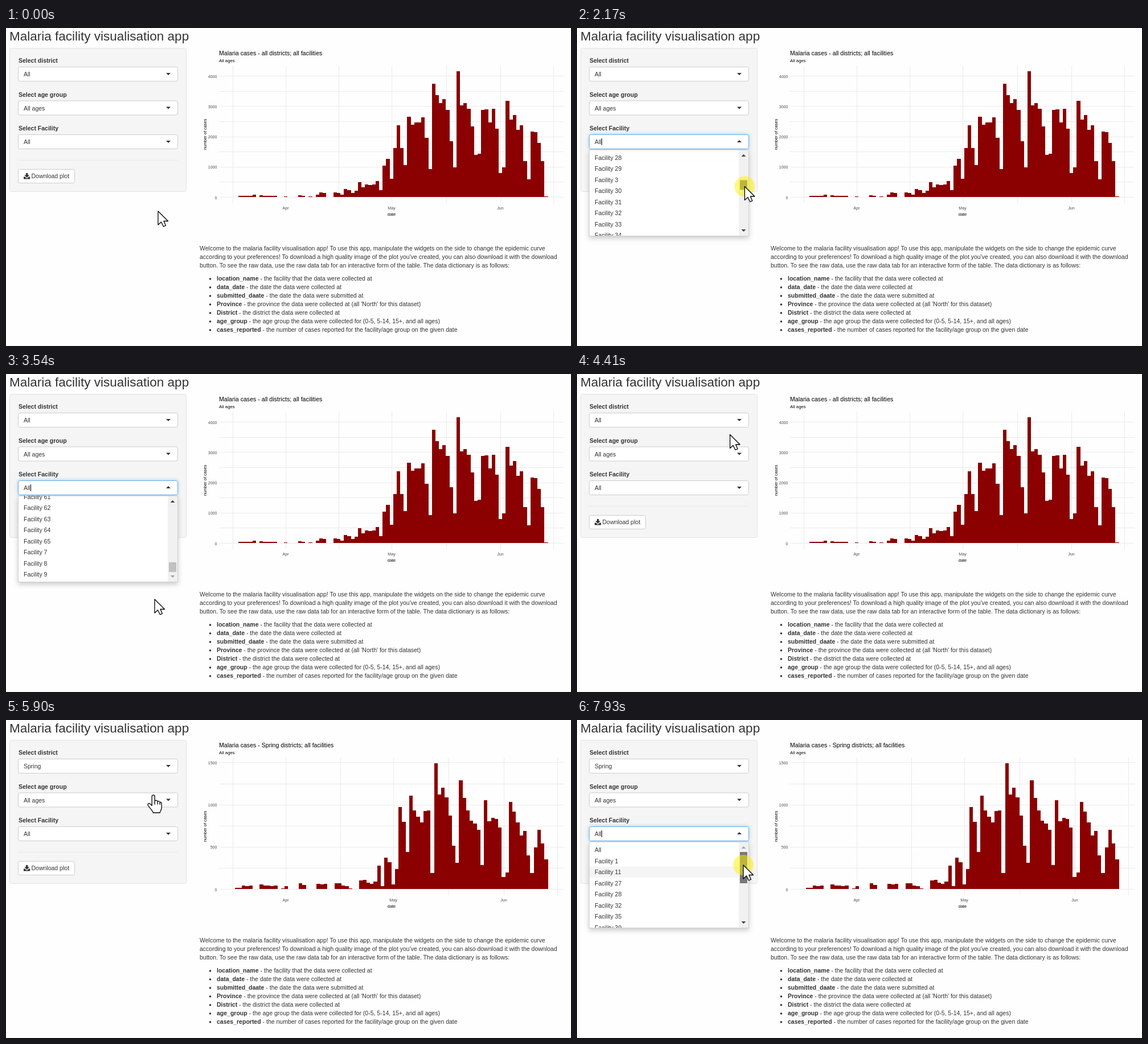
Write an HTML page that moves like this. It is 992 px wide and 559 px high and loops after 7.99 s.

```html
<!DOCTYPE html>
<html lang="en">
<head>
<meta charset="utf-8">
<title>Malaria facility visualisation app</title>
<style>
  html, body { margin: 0; width: 100%; height: 100%; overflow: hidden; background: #fefefe; }
  svg { display: block; width: 992px; height: 559px; }
  text { font: 10.5px "Liberation Sans", Arial, sans-serif; fill: #333; white-space: pre; }
  .b { font-weight: bold; }
  .h { font-size: 22.5px; }
  .ct { font-size: 10.6px; fill: #000; }
  .cs { font-size: 7.8px; fill: #000; }
  .ca { font-size: 7.4px; fill: #000; }
  .cl { font-size: 7.1px; fill: #4d4d4d; }
  .mid { text-anchor: middle; }
  .end { text-anchor: end; }
  .field { fill: #fff; stroke: #ccc; }
  .on .field { stroke: #66afe9; filter: drop-shadow(0 0 3px rgba(102,175,233,.6)); }
  .menu { fill: #fff; stroke: #d2d2d2; filter: drop-shadow(0 4px 4px rgba(0,0,0,.2)); }
  .hi { fill: #f5f5f5; }
  .cur { fill: #fff; stroke: #000; stroke-width: 1.3; stroke-linejoin: round; }
</style>
</head>
<body>
<svg id="stage" viewBox="0 0 992 559" xmlns="http://www.w3.org/2000/svg"></svg>
<script>
const LOOP = 7990, ROW = 19.5;

// bar heights in pixels, one per day
const allBars = [
  0, 2, 2, 2, 2, 4, 0, 3, 2, 2, 2, 2, 0, 0, 1, 0, 0, 0, 3, 2, 0, 1, 0, 4, 8, 7, 0, 0, 8, 7,
  4, 14, 12, 7, 11, 26, 17, 22, 21, 22, 28, 12, 55, 67, 32, 86, 126, 86, 56, 141, 127, 131,
  131, 140, 104, 49, 199, 179, 165, 172, 153, 98, 52, 221, 161, 165, 155, 124, 74, 76, 153,
  154, 131, 155, 120, 42, 52, 169, 136, 144, 118, 126, 63, 31, 115, 114, 95, 63, 1];
const springBars = [
  2, 2, 6, 5, 6, 0, 0, 8, 6, 6, 5, 6, 0, 1, 5, 0, 0, 0, 10, 7, 0, 0, 0, 9, 8, 9, 0, 0, 10, 10,
  6, 5, 1, 0, 0, 15, 16, 11, 9, 13, 41, 5, 55, 47, 8, 35, 144, 118, 65, 164, 138, 127, 117,
  137, 138, 28, 221, 166, 178, 161, 129, 76, 46, 191, 160, 138, 120, 115, 104, 42, 156, 119,
  125, 123, 108, 21, 29, 153, 136, 117, 94, 102, 59, 28, 73, 104, 80, 52];

// pointer path: time, x, y
const path = [
  [40, 267, 322], [400, 290, 180], [590, 288, 207], [790, 288, 207], [820, 288, 194],
  [1300, 288, 194], [1440, 288, 228], [1520, 288, 228], [1700, 293, 243], [2680, 296, 317],
  [2740, 296, 317], [3000, 297, 345], [3220, 298, 371], [3370, 298, 371], [3540, 261, 396],
  [3840, 261, 396], [4500, 269, 91], [4690, 269, 91], [5030, 258, 131], [5880, 258, 131],
  [6280, 287, 201], [6600, 287, 201], [6680, 290, 202], [6970, 290, 202], [7300, 286, 228],
  [7480, 281, 270], [7760, 292, 255], [LOOP, 292, 255]];
const clicks = [[1060, 1350], [1700, 3390], [3610, 3850], [4550, 4710], [5340, 5430], [6530, 6680], [7930, LOOP]];

const within = (t, a, b) => t >= a && t < b;
const clamp = v => Math.max(0, Math.min(1, v));
const text = (x, y, s, cls = '', more = '') => `<text x="${x}" y="${y}" class="${cls}" ${more}>${s}</text>`;
const rect = (x, y, w, h, more) => `<rect x="${x}" y="${y}" width="${w}" height="${h}" ${more}/>`;
const shape = (d, more) => `<path d="${d}" ${more}/>`;

function chart(id, name, step, bars, xs, unit, half, lines) {
  let grid = '', marks = '', d = '';
  xs.forEach((x, i) => {
    grid += `M${x + .5} 66V308`;
    if (i % 2) marks += text(x, 319, ['Apr', 'May', 'Jun'][(i - 1) / 2], 'cl mid');
  });
  for (let i = 0; i <= lines; i++) {
    const y = 297.5 - i * half;
    grid += `M374 ${Math.floor(y) + .5}H979`;
    if (i % 2 == 0) marks += text(370.5, y + 3, i / 2 * unit, 'cl end');
  }
  bars.forEach((h, i) => { if (h) d += `M${(401.6 + i * step).toFixed(2)} 297v${-h}h${step}v${h}z`; });
  return `<g id="${id}">` + shape(grid, 'stroke="#ebebeb" fill="none"') +
    shape(d, 'fill="#8b0000" shape-rendering="crispEdges"') + marks +
    text(374, 48, `Malaria cases - ${name} districts; all facilities`, 'ct') +
    text(374, 60, 'All ages', 'cs') + text(677, 330, 'date', 'ca mid') +
    text(0, 0, 'number of cases', 'ca mid', 'transform="translate(352 187) rotate(-90)"') + '</g>';
}

function select(id, label, value, y) {
  return `<g id="${id}">` + text(22, y - 20, label, 'b') +
    rect(21.5, y - 12.5, 280, 25, 'rx="3" class="field"') + text(31, y + 4, value, 'val') +
    shape(`M281 ${y - 2}h8l-4 4z`, 'fill="#333" class="down"') +
    shape(`M281 ${y + 1}h8l-4 -4z`, 'fill="#333" class="up"') + '</g>';
}

const rows = (id, list, y) => `<g id="${id}">` +
  list.map((s, i) => text(31, y + i * ROW, s)).join('') + '</g>';

const facility = n => 'Facility ' + n;
const allList = ['All', ...Array.from({ length: 65 }, (_, i) => String(i + 1)).sort().map(facility)];
const springList = ['All', ...[1, 11, 27, 28, 32, 35, 39].map(facility)];

const intro = [
  'Welcome to the malaria facility visualisation app! To use this app, manipulate the widgets on the side to change the epidemic curve',
  "according to your preferences! To download a high quality image of the plot you've created, you can also download it with the download",
  'button. To see the raw data, use the raw data tab for an interactive form of the table. The data dictionary is as follows:'];
const terms = [
  ['location_name', 'the facility that the data were collected at'],
  ['data_date', 'the date the data were collected at'],
  ['submitted_daate', 'the date the data were submitted at'],
  ['Province', "the province the data were collected at (all 'North' for this dataset)"],
  ['District', 'the district the data were collected at'],
  ['age_group', 'the age group the data were collected for (0-5, 5-14, 15+, and all ages)'],
  ['cases_reported', 'the number of cases reported for the facility/age group on the given date']];

const stage = document.getElementById('stage');
stage.innerHTML =
  '<clipPath id="clip">' + rect(22, 214, 279, 151, '') + '</clipPath>' +
  rect(0, 558, 992, 1, 'fill="#f0f0f0"') +
  text(6, 22, 'Malaria facility visualisation app', 'h') +
  rect(6.5, 35.5, 310, 252, 'rx="3" fill="#f5f5f5" stroke="#e3e3e3"') +
  select('district', 'Select district', 'All', 81) +
  select('age', 'Select age group', 'All ages', 140.5) +
  select('place', 'Select Facility', 'All', 200) +
  rect(43, 194, 1, 12, 'fill="#000" id="caret"') +
  rect(21, 232, 281, 1, 'fill="#eaeaea"') +
  rect(21.5, 248.5, 99, 24, 'rx="3" class="field"') +
  shape('M35 255h3.4v3.6h2.8l-4.5 4.4l-4.5 -4.4h2.8zM31 261.5h2.2l3.5 3l3.5 -3h2v4h-11.2z', 'fill="#333"') +
  text(44.5, 264, 'Download plot') +
  chart('plotAll', 'all', 6.18, allBars, [398, 491, 584, 677, 773, 868, 961], 1000, 26.6, 8) +
  chart('plotSpring', 'Spring', 6.25, springBars, [398, 491, 587, 680, 777, 874, 968], 500, 37.1, 6) +
  intro.map((s, i) => text(340, 391 + i * 15, s)).join('') +
  terms.map(([k, v], i) => `<circle cx="358.5" cy="${441 + i * 15}" r="1.8" fill="#333"/>` +
    text(370, 444 + i * 15, `<tspan class="b">${k}</tspan> - ${v}`)).join('') +
  '<g id="placeMenu">' + rect(21.5, 214.5, 280, 151, 'class="menu"') +
  '<g clip-path="url(#clip)"><g id="scroller">' + rect(22, 0, 262, ROW, 'class="hi" id="placeHi"') +
  rows('rowsAll', allList, 232) + rows('rowsSpring', springList, 232) + '</g></g>' +
  rect(284, 215, 17, 150, 'fill="#f1f1f1"') + rect(286, 232, 13, 17, 'id="thumb"') +
  shape('M288.5 226h8l-4 -4z', 'id="arrUp"') + shape('M288.5 354h8l-4 4z', 'id="arrDown"') + '</g>' +
  '<g id="districtMenu">' + rect(21.5, 95.5, 280, 106, 'class="menu"') +
  rect(22, 0, 279, ROW, 'class="hi" id="districtHi"') +
  rows('rowsDistrict', ['All', 'Spring', 'Bolo', 'Dingo', 'Barnard'], 113) + '</g>' +
  '<g id="pointer"><circle r="18" id="ring" fill="#fff200" fill-opacity=".5"/>' +
  shape('M0 0V24L5.5 19L9.5 27L13.5 25.2L10 17.5H17.5Z', 'class="cur" id="arrow"') +
  '<g id="hand">' + shape('M-2 3C-2 -.5 3 -.5 3 3V11C4 9 8 9.5 8 12C9 10.5 12 11 12 13.5C13 12.5 15 13 15 15.5V22C15 27 12.5 28 12 31.5H0C0 28 -6 24 -9 18C-10 15 -6 14 -4 17L-2 19Z', 'class="cur"') +
  shape('M3 11V17M8 12V17M12 13.5V17.5', 'class="cur"') + '</g><g id="beam" fill="none">' +
  shape('M-6 -11.5H-2Q0 -11.5 0 -9.5Q0 -11.5 2 -11.5H6M0 -10V10M-6 11.5H-2Q0 11.5 0 9.5Q0 11.5 2 11.5H6', 'stroke="#000" stroke-width="2.2"') +
  '</g></g>';

const el = {};
stage.querySelectorAll('[id]').forEach(e => el[e.id] = e);
const show = (e, on) => e.style.display = on ? '' : 'none';
const set = (e, o) => { for (const k in o) e.setAttribute(k, o[k]); };

function pointerAt(t) {
  if (t <= path[0][0]) return path[0].slice(1);
  const i = path.findIndex(p => p[0] > t);
  const [ta, xa, ya] = path[i - 1], [tb, xb, yb] = path[i];
  let u = (t - ta) / (tb - ta);
  if (!within(t, 1700, 3220)) u = u * u * (3 - 2 * u);
  return [xa + (xb - xa) * u, ya + (yb - ya) * u];
}

function cursorKind(x, y, drag, districtOpen, placeOpen) {
  if (drag) return 'arrow';
  if (districtOpen && within(y, 95, 201)) return 'hand';
  if (placeOpen && within(y, 214, 365)) return x < 284 ? 'hand' : 'arrow';
  if (within(y, 187, 213)) return placeOpen ? 'beam' : 'hand';
  return within(y, 68, 94) || within(y, 128, 153) ? 'hand' : 'arrow';
}

function focus(g, on) {
  g.setAttribute('class', on ? 'on' : '');
  show(g.querySelector('.up'), on);
  show(g.querySelector('.down'), !on);
}

function draw(t) {
  const [x, y] = pointerAt(t);
  const second = t >= 6600;
  const placeOpen = within(t, 1140, 3690) || second;
  const districtOpen = within(t, 4630, 5430);
  const drag = within(t, 1700, 3390);
  const pressed = clicks.some(([a, b]) => within(t, a, b));

  focus(el.district, districtOpen);
  focus(el.age, false);
  focus(el.place, placeOpen);
  el.district.querySelector('.val').textContent = t < 5430 ? 'All' : 'Spring';
  show(el.caret, placeOpen);
  show(el.plotAll, t < 5740);
  show(el.plotSpring, t >= 5740);

  show(el.placeMenu, placeOpen);
  show(el.rowsAll, !second);
  show(el.rowsSpring, second);
  const pos = second || t < 1700 ? 0 : t < 3000 ? clamp((y - 243) / 99) : 1;
  let row = t > 7400 ? 2 : 0;
  if (second && x < 284) row = Math.floor((y - 218.5) / ROW);
  set(el.placeHi, { y: 218.5 + row * ROW });
  set(el.scroller, { transform: `translate(0 ${-1143.5 * pos})` });
  set(el.thumb, { y: 232 + 99 * pos, height: second ? 55 : 17, fill: drag || t >= 7930 ? '#787878' : '#c1c1c1' });
  set(el.arrUp, { fill: pos > 0 ? '#404040' : '#a3a3a3' });
  set(el.arrDown, { fill: pos < 1 ? '#404040' : '#a3a3a3' });

  show(el.districtMenu, districtOpen);
  set(el.districtHi, { y: y > 119.5 ? 119 : 99.5 });

  set(el.pointer, { transform: `translate(${x.toFixed(1)} ${y.toFixed(1)})` });
  show(el.ring, pressed);
  const kind = cursorKind(x, y, drag, districtOpen, placeOpen);
  for (const k of ['arrow', 'hand', 'beam']) show(el[k], k == kind);
}

let start;
function tick(now) {
  start ??= now;
  draw((now - start) % LOOP);
  requestAnimationFrame(tick);
}
draw(0);
requestAnimationFrame(tick);
</script>
</body>
</html>
```
